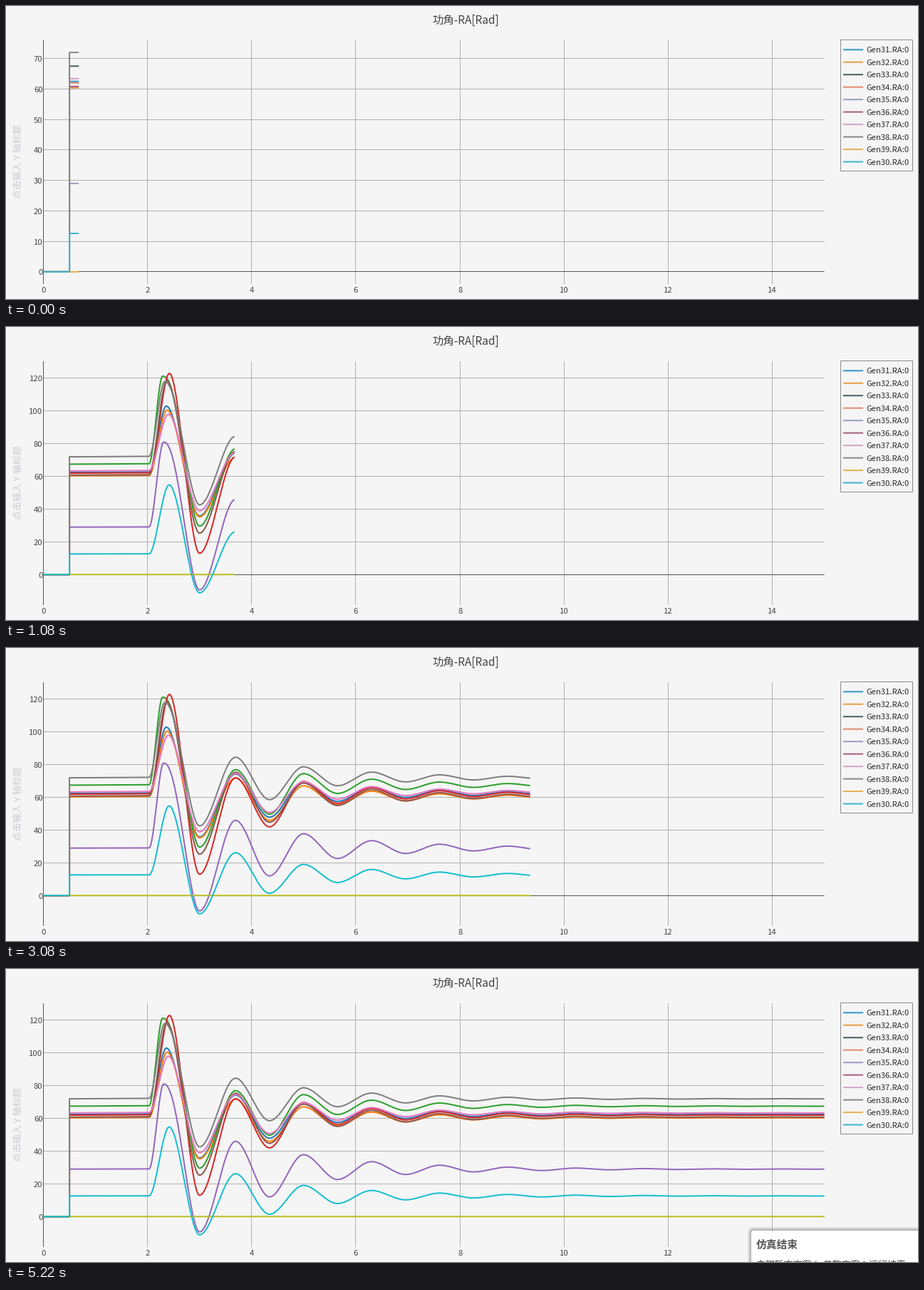
Write a matplotlib script that moves like this. It is 1280 px wide and 411 px high and loops after 5.25 s.

```python
import numpy as np
import matplotlib.pyplot as plt
from matplotlib.animation import FuncAnimation
from matplotlib.patches import FancyBboxPatch, Rectangle

W, H, DPI = 1280, 411, 128
PX = 72 / DPI                      # one pixel in points
LOOP, FRAME_MS = 5250, 30
PEN_MS, POPUP_AT = 52.5, 5220      # pause between pen moves, popup time
LEFT, RIGHT, TOP, BOTTOM = 52.5, 1148.5, 48, 390
T_MAX = 15
SCALE = (RIGHT - LEFT) / T_MAX
STEP_ON, FAULT, TROUGH_AT = 0.5, 2.03, 3.0
NEXT_TURN, HALF_PERIOD, DECAY = 3.69, 0.653, 0.72

plt.rcParams["font.family"] = ["Noto Sans CJK JP"]

NAMES = [f"Gen{n}.RA:0" for n in [*range(31, 40), 30]]
COLORS = ["#1f77b4", "#ff7f0e", "#2ca02c", "#d62728", "#9467bd",
          "#8c564b", "#e377c2", "#7f7f7f", "#bcbd22", "#17becf"]
MUTED = ["#3797cb", "#e8a045", "#42625f", "#e28b70", "#9a9dc2",
         "#a55f7d", "#d3a5c8", "#888888", "#e3b150", "#3fb4cd"]

# rest level, first peak, its time, first trough, later swing, sag of that swing
MACHINES = [
    (62.5, 103, 2.36, 35.8, 13.2, -1.4),
    (60.4, 100.5, 2.375, 35.3, 12.9, -1.5),
    (67.5, 121.3, 2.29, 29.6, 13.6, -4.1),
    (62, 123, 2.42, 13, 15, -5),
    (29, 81, 2.31, -9.4, 17, 0),
    (60.8, 118.5, 2.37, 25.3, 15.3, -0.7),
    (63.4, 98, 2.4, 39, 11.9, -0.7),
    (72, 118, 2.33, 42.6, 13, -0.4),
    (0, 0, 2.36, 0, 0, 0),
    (12.6, 54.8, 2.415, -11.2, 12.4, 1.2),
]

# Pen progress: loop time (ms) and simulated time (s)
PEN_KEYS = ([0, 525, 682, 1680, 3045, 3937, 4830, 5197],
            [0.68, 1.95, 2.56, 5.577, 9.355, 11.97, 14.76, 15])


def swing_values(t, rest, peak, peak_at, trough, swing, sag):
    """Rest, one large swing after the fault, then a decaying oscillation."""
    k = np.arange(18)
    size = np.where(k < 2, 1, DECAY ** k)
    turns = rest + swing * size * (-1.0) ** k + np.where(k < 2, sag, 0)
    at = np.concatenate([[STEP_ON, FAULT, peak_at, TROUGH_AT],
                         NEXT_TURN + HALF_PERIOD * k])
    level = np.concatenate([[rest, rest * 1.004, peak, trough], turns])

    i = np.clip(np.searchsorted(at, t, "right") - 1, 0, len(at) - 2)
    u = (t - at[i]) / (at[i + 1] - at[i])
    linger = 1 + 3 * max(0, 2.36 - peak_at)      # early peaks fall more slowly
    u = np.where(i == 2, u ** linger, u)
    return level[i] + (level[i + 1] - level[i]) * u * u * (3 - 2 * u)


live = np.linspace(STEP_ON, T_MAX, 1451)
time_px = LEFT + SCALE * np.concatenate([[0, STEP_ON], live])
values = np.array([np.concatenate([[0, 0], swing_values(live, *m)])
                   for m in MACHINES])

fig = plt.figure(figsize=(W / DPI, H / DPI), dpi=DPI, facecolor="#f5f5f5")
ax = fig.add_axes([0, 0, 1, 1])
ax.set_xlim(0, W)
ax.set_ylim(H, 0)
ax.axis("off")


def line(xs, ys, color, width=1, z=1):
    return ax.plot(xs, ys, color=color, lw=width * PX, zorder=z, snap=False,
                   solid_capstyle="butt", solid_joinstyle="round")[0]


def label(x, y, text, size=11.3, color="#444444", ha="center", **kw):
    """Text whose middle sits at y."""
    return ax.text(x, y + 0.37 * size, text, fontsize=size * PX, color=color,
                   ha=ha, va="baseline", **kw)


def crisp(v):
    """Centre of the pixel that holds v."""
    return np.floor(v) + 0.5


# Fixed parts
label(645, 19, "功角-RA[Rad]", 15.4)
ax.text(21, 218.5, "点击输入 Y 轴标题", fontsize=13 * PX, color="#cbccd2",
        ha="center", va="baseline", rotation=90, rotation_mode="anchor")
for tick in range(0, T_MAX, 2):
    x = crisp(LEFT + tick * SCALE)
    line([x, x], [TOP, BOTTOM], "#b0b0b0" if tick else "#555555",
         z=1 if tick else 2)
    label(x, 398, str(tick))

ax.add_patch(Rectangle((1171.5, 47.5), 101, 184, fc="#f5f5f5", ec="#8c8c8c",
                       lw=PX, zorder=4, snap=False))
for i, name in enumerate(NAMES):
    y = 61.3 + 17.47 * i
    line([1175, 1203], [y, y], MUTED[i], 2, 5)
    label(1207, y, name, color="#2c2c2c", ha="left", zorder=5)

# Moving parts
grid = [line([LEFT, RIGHT], [0, 0], "#b0b0b0") for _ in range(10)]
ticks = [label(51.5, 0, "", ha="right") for _ in grid]
zero = line([LEFT, RIGHT], [0, 0], "#555555", z=2)
traces = [line([], [], c, 2, 3) for c in COLORS]


def popup_box(grow, color, alpha):
    box = FancyBboxPatch((1046 - grow, 367 - grow), 330 + 2 * grow, 100,
                         boxstyle=f"round,pad=0,rounding_size={3 + grow}",
                         fc=color, ec="none", alpha=alpha, zorder=10)
    return ax.add_patch(box)


popup = [popup_box(g, "#000000", 0.06) for g in range(5, 0, -1)]
popup += [
    popup_box(0, "#ffffff", 1),
    label(1053, 386, "仿真结束", 14.8, "#555555", "left", weight="bold", zorder=11),
    label(1053, 413.5, "电磁暂态方案 1, 参数方案 1 运行结束", 12.9, "#444444",
          "left", zorder=11),
]


def draw(frame):
    now = frame * FRAME_MS + 22
    step = now // PEN_MS
    pen = LEFT + SCALE * np.interp(step * PEN_MS, *PEN_KEYS)
    n = np.searchsorted(time_px, pen + 0.01, "right")
    shown = values[:, :n]

    # Automatic range: 5 % of the height stays free at both ends
    low, high = shown.min(), shown.max()
    span = (high - low) / 0.9
    bottom = low - 0.05 * span

    def to_y(v):
        return BOTTOM - (v - bottom) / span * (BOTTOM - TOP)

    gap = 10 if span < 95.5 else 20
    for i, (rule, text) in enumerate(zip(grid, ticks)):
        y = crisp(to_y(i * gap))
        rule.set_ydata([y, y])
        text.set_y(y + 0.37 * 11.3)
        text.set_text(str(i * gap))
        for part in (rule, text):
            part.set_visible(y > TOP)
    zero.set_ydata([crisp(to_y(0))] * 2)

    palette = COLORS if step else MUTED
    for trace, row, color in zip(traces, shown, palette):
        trace.set_data(time_px[:n], to_y(row))
        trace.set_color(color)

    for part in popup:
        part.set_visible(now >= POPUP_AT)
    return traces


anim = FuncAnimation(fig, draw, frames=LOOP // FRAME_MS, interval=FRAME_MS,
                     repeat=True, repeat_delay=0, blit=False)
plt.show()
```
